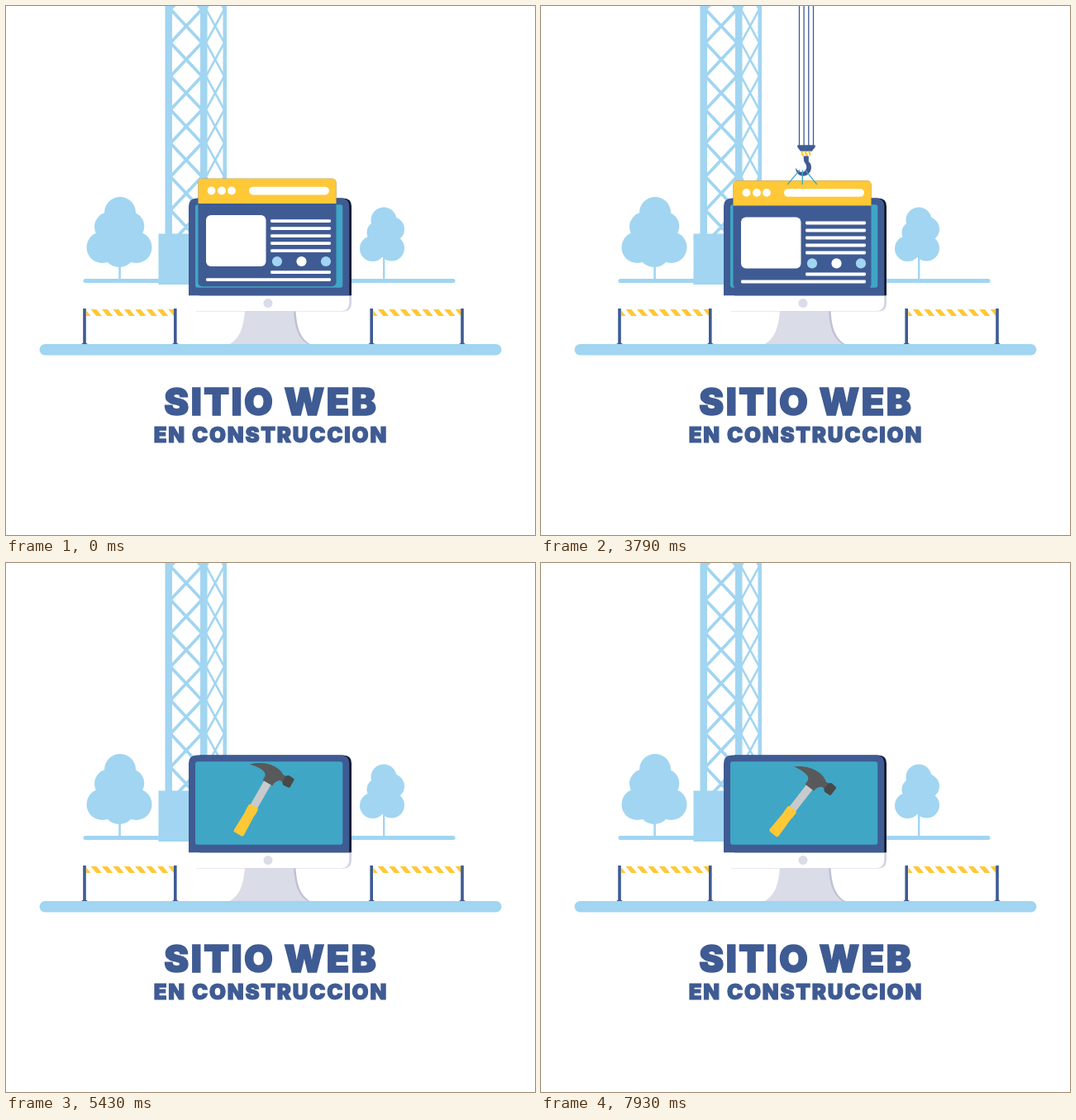
Recreate the animation shown at these times as an HTML page. Size 640x640 px, loop 8 s.

```html
<!DOCTYPE html>
<html lang="es">
<head>
<meta charset="utf-8">
<title>Sitio web en construccion</title>
<style>
html, body { margin: 0; width: 100%; height: 100%; overflow: hidden; background: #fff; }
svg { display: block; width: 100%; height: 100%; }
text { font-family: Inter, "Noto Sans", sans-serif; font-weight: 900; text-anchor: middle; fill: #3f5b93; stroke: #3f5b93; }
</style>
</head>
<body>
<svg viewBox="0 0 640 640">
  <defs>
    <clipPath id="tapeClip"><rect width="106" height="8"/></clipPath>
    <clipPath id="bandClip"><path d="M314 172H327.2L326 178.5H315.5Z"/></clipPath>
    <g id="barrier" fill="#3f5b93">
      <g id="tape" transform="translate(4 1)" clip-path="url(#tapeClip)" fill="#ffc837"></g>
      <path d="M0 0H3.6V41.5L5.6 43H-2L0 41.5ZM109.8 0H113.4V41.5L115.4 43H107.8L109.8 41.5Z"/>
    </g>
  </defs>

  <g id="crane" fill="#a1d5f1" stroke="#a1d5f1">
    <path stroke="none" d="M192.5 0H201V277H192.5ZM235 0H243.5V277H235ZM262.5 0H267V277H262.5ZM184.5 275.5H250V337H184.5Z"/>
  </g>

  <g fill="#a1d5f1">
    <rect x="93.5" y="330" width="450" height="5" rx="2.5"/>
    <rect x="40.5" y="409" width="559" height="13.5" rx="6.75"/>
    <g id="trees"></g>
    <path d="M136.3 290H138.9V331H136.3ZM456 290H458.4V331H456Z"/>
  </g>

  <use href="#barrier" x="93.2" y="366"/>
  <use href="#barrier" x="440.4" y="366"/>

  <path fill="#bfc1d6" d="M300 369H350.5C352 390 356 402 368 409H300Z"/>
  <path fill="#dadce8" d="M289 369H348C349.5 390 353.5 402 365 409H270.5C283 402 287 390 289 369Z"/>
  <path fill="#d3d5e2" d="M230 349H418V359.5Q418 369.5 408 369.5H230Z"/>
  <path fill="#fff" d="M221 349H415.2V359Q415.2 369 405.2 369H231Q221 369 221 359Z"/>
  <path fill="#111a33" d="M234 232.5H408Q418 232.5 418 242.5V350.3H234Z"/>
  <path fill="#3f5b93" d="M231 232.5H405.2Q415.2 232.5 415.2 242.5V350.3H221V242.5Q221 232.5 231 232.5Z"/>
  <rect x="229" y="240.3" width="178.3" height="100.4" rx="3" fill="#40a6c5"/>
  <circle cx="317" cy="359.6" r="5.5" fill="#dadce8"/>

  <g id="hammer">
    <rect x="-4.8" y="-75" width="9.6" height="40" fill="#c9cacb"/>
    <path fill="#ffc837" d="M-6.8 -2.5Q-6.8 0 -4.3 0H4.3Q6.8 0 6.8 -2.5L6 -28L6.4 -30V-37Q6.4 -39 4.4 -39H-4.4Q-6.4 -39 -6.4 -37V-30L-6 -28Z"/>
    <path fill="#58595b" d="M-30 -80.3C-21 -88.5 -11 -93 -2 -93C4 -93 8 -92 11.5 -89.5H17V-81.5H11.5C8.5 -79 7 -76 7 -71.5H-6.5V-76C-7 -83 -16 -83.5 -30 -80.3Z"/>
    <path fill="#47484a" d="M15 -90L18 -92.3L25 -91.8Q26.3 -91.5 26.3 -90V-81Q26.3 -79.6 25 -79.3L18 -78.6L15 -81Z"/>
  </g>

  <g id="page">
    <rect x="232.5" y="208.8" width="167" height="130.5" rx="5" fill="#3f5b93"/>
    <path fill="#ffc837" d="M232.5 239V213.8Q232.5 208.8 237.5 208.8H394.5Q399.5 208.8 399.5 213.8V239Z"/>
    <g id="content" fill="#fff">
      <rect x="294" y="218.8" width="97" height="9.6" rx="4.8"/>
      <rect x="242" y="253" width="72.5" height="62" rx="6"/>
    </g>
  </g>

  <g id="hook" fill="#3f5b93">
    <path stroke="#3f5b93" stroke-width="1.3" d="M312.5 -40V166M318.1 -40V166M323.8 -40V166M329.5 -40V166"/>
    <path d="M310.3 165H331.7V167.5L327.6 172.5H314L310.3 167.5Z"/>
    <g id="band" clip-path="url(#bandClip)" fill="#ffc837"></g>
    <path d="M317.7 178.3H323.8V185C327.8 188 328 194.5 324.7 198.5C319.5 205 309 203.8 307.9 192.6C310.7 196.8 314 198.5 317.1 197.5C321.8 195.7 322.3 190 319.6 187C318.1 185.5 317.7 183 317.7 178.3Z"/>
  </g>

  <g id="sling" fill="none" stroke="#40a6c5" stroke-width="1.3">
    <path d="M298.3 213.5L313 196M316.3 213.5V196M333.8 213.5L319.6 196"/>
  </g>

  <text x="320.7" y="494.8" font-size="45" letter-spacing="2.4" stroke-width="1.5">SITIO WEB</text>
  <text x="320.4" y="527.5" font-size="25.8" letter-spacing="1.8" stroke-width="1.1">EN CONSTRUCCION</text>
</svg>
<script>
const LOOP = 8000, FPS = 14;
const $ = id => document.getElementById(id);

function add(parent, tag, attrs) {
  const el = document.createElementNS('http://www.w3.org/2000/svg', tag);
  for (const k in attrs) el.setAttribute(k, attrs[k]);
  $(parent).prepend(el);
}

// Rows of crossed struts between two rails
function lattice(x0, x1, width) {
  const cell = 40.5;
  let d = '';
  for (let y = 4; y < 277; y += cell) d += `M${x0} ${y}L${x1} ${y + cell}M${x1} ${y}L${x0} ${y + cell}`;
  d += `M${x0} 4L${x1} ${4 - cell}M${x1} 4L${x0} ${4 - cell}`;
  add('crane', 'path', { d, fill: 'none', 'stroke-width': width });
}
lattice(199, 237, 3.8);
lattice(242, 264, 2.6);

function stripes(parent, x, y, count, step, w, h, lean) {
  let d = '';
  for (let i = 0; i < count; i++) d += `M${x + i * step} ${y}h${w}l${lean} ${h}h${-w}Z`;
  add(parent, 'path', { d });
}
stripes('tape', -8, 0, 9, 13.4, 6.8, 8, 6.5);
stripes('band', 313.5, 172, 4, 4.6, 2.6, 6.5, 2.5);

const leaves = [
  [138, 250, 19], [124.5, 267, 17.5], [150, 266.5, 17.3], [116.5, 292, 19], [157.5, 292, 19], [137, 296.5, 19.5], [137, 280, 18],
  [457, 259, 15.5], [450, 274, 13.5], [467, 270, 15], [443.5, 293.5, 15.5], [466.5, 293, 15.5], [457, 283, 12]
];
for (const [cx, cy, r] of leaves) add('trees', 'circle', { cx, cy, r });

const bar = (x, y) => add('content', 'rect', { x, y, width: 393 - x, height: 3.8, rx: 1.4 });
for (let i = 0; i < 5; i++) bar(320, 258.2 + i * 9);
bar(320, 320.2);
bar(242, 329.2);
for (const cx of [248.5, 261, 273]) add('content', 'circle', { cx, cy: 223.5, r: 4.9 });
[328, 357.5, 387].forEach((cx, i) =>
  add('content', 'circle', { cx, cy: 309, r: 6.1, fill: i === 1 ? '#fff' : '#a1d5f1' }));

const progress = (t, start, length) => Math.min(1, Math.max(0, (t - start) / length));
const backIn = (p, s) => (s + 1) * p ** 3 - s * p * p;
const backOut = (p, s) => 1 - backIn(1 - p, s);

// Slow steady lift, then a quick strike
function hammerAngle(t) {
  const low = 24.7, swing = 64, rise = 2400, fall = 400, period = rise + fall;
  const phase = (t - 4100 + 2 * period) % period;
  return low + swing * (phase < rise ? phase / rise : (period - phase) / fall);
}

function draw(t) {
  const drop = backOut(progress(t, 150, 1430), 0.9);
  const lift = backIn(progress(t, 3134, 1430), 0.9);
  const grow = backOut(progress(t, 1720, 1420), 1.7);
  const pageY = -340 * lift;

  $('hook').setAttribute('transform', `translate(0 ${-206 * (1 - drop) - 457 * lift})`);
  $('page').setAttribute('transform', `translate(0 ${pageY})`);
  $('sling').setAttribute('transform', `translate(316 ${213.5 + pageY}) scale(${grow}) translate(-316 -213.5)`);
  $('sling').setAttribute('visibility', grow > 0.001 ? 'visible' : 'hidden');
  $('hammer').setAttribute('transform', `translate(280.7 328) rotate(${90 - hammerAngle(t)})`);
}

function tick() {
  const t = performance.now() % LOOP;
  draw(Math.floor((t + 5) * FPS / 1000) * 1000 / FPS);
  requestAnimationFrame(tick);
}
tick();
</script>
</body>
</html>
```
